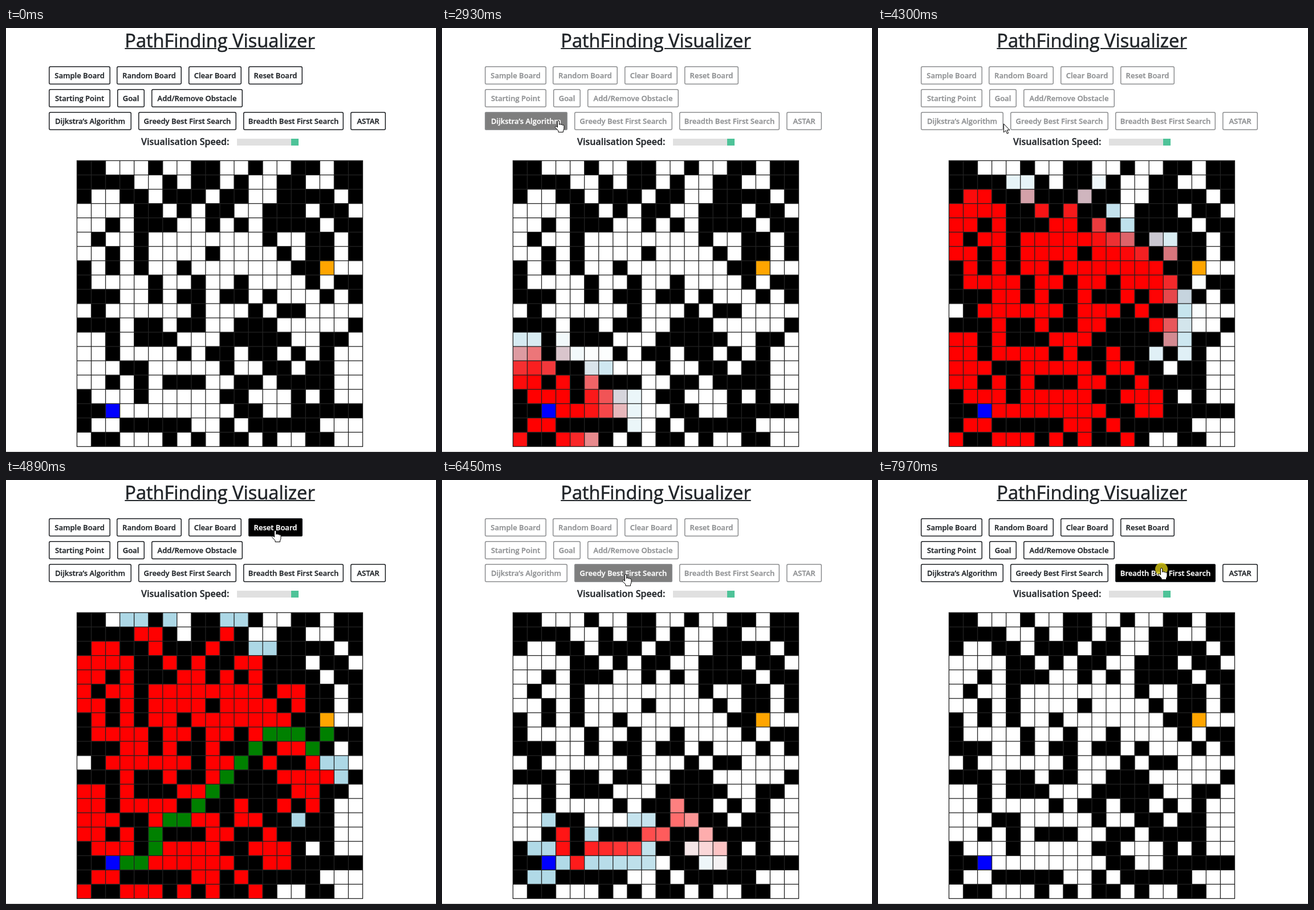
These frames come from a looping animation (754x743 px, 8 s). An HTML page with a canvas:

```html
<!DOCTYPE html>
<html lang="en">
<head>
<meta charset="utf-8">
<title>PathFinding Visualizer</title>
<style>
html, body { margin: 0; width: 100%; height: 100%; overflow: hidden; background: #fff; }
body { position: relative; font-family: "Open Sans", "Noto Sans", sans-serif; color: #212529; }
body > * { position: absolute; white-space: nowrap; }
h1 { left: 0; top: 0; width: 750px; margin: 0; text-align: center;
  font-size: 32.6px; font-weight: 400; line-height: 44px; text-decoration: underline 2px;
  -webkit-text-stroke: .6px; }
.btn { height: 32px; line-height: 32px; text-align: center; font-size: 13.05px; font-weight: 600;
  -webkit-text-stroke: .3px; border-radius: 3px; box-shadow: inset 0 0 0 1.5px #1c1f23; }
.btn.hover { background: #000; color: #fff; }
#label { left: 237px; top: 187px; line-height: 24px; font-size: 16.05px; font-weight: 600;
  -webkit-text-stroke: .3px; }
#slider { left: 405px; top: 194px; width: 108px; height: 12px; background: #d3d3d3; }
#slider i { position: absolute; right: 0; width: 13px; height: 12px; background: #04aa6d; }
#rule { left: 0; top: 742px; width: 754px; height: 1px; background: #c8c8c8; }
canvas, svg { left: 0; top: 0; }
</style>
</head>
<body>
<canvas id="board" width="754" height="743"></canvas>
<h1>PathFinding Visualizer</h1>
<div id="label">Visualisation Speed:</div>
<div id="slider"><i></i></div>
<div id="rule"></div>
<svg id="overlay" width="754" height="743" style="z-index:1">
  <circle id="click" r="11" fill="#d7c814" fill-opacity=".8"/>
  <g id="cursor" fill="#fff" stroke="#000" stroke-linejoin="round">
    <path id="arrow" d="M0 0V15L3.5 11.8L6 17.3L8.2 16.3L5.8 11H10.5Z"/>
    <path id="hand" transform="translate(-6.5 0)" d="M5 12V2a1.6 1.6 0 0 1 3.2 0v5.5a1.5 1.5 0 0 1 3 .3a1.5 1.5 0 0 1 2.8 .7a1.4 1.4 0 0 1 2.5 .8V14q0 2-1.5 4v2.5H6.5V18L1.2 12.5a1.5 1.5 0 0 1 2-2L5 12z"/>
  </g>
</svg>
<script>
const $ = id => document.getElementById(id);
const LOOP = 8000, TICK = 11, FADE = 275, SIZE = 20;
const WHITE = [255, 255, 255], OPEN = [173, 216, 230], VISITED = [255, 0, 0], PATH = [0, 128, 0];

const walls = `
##...#..##..#..##.##
####..#.##.#..##..##
#..##.###.##..####.#
....##.#.##..###.##.
..#.###..#.#.####.##
.#..#........#..##.#
..#.#....#....#.##.#
#.#.#..#.......##...
#....#..#..#....#.##
###..#.##.##.#...#.#
.#......#...#.##....
###.##.##..###.....#
..#.###...#####..##.
..#....#.##.##.#.#..
...##.....#..##.##..
..#.#.###..##.####..
#...#.....##...#.#..
##.........##..#####
#..#####..#.#####...
.##...#.#.##.#..##..`.replace(/\n/g, '');

const START = 17 * SIZE + 2, GOAL = 7 * SIZE + 17;
const row = i => Math.floor(i / SIZE), col = i => i % SIZE;
// Row and column steps: straight ones first, then diagonals
const STEPS = [[-1, 0], [0, 1], [1, 0], [0, -1], [-1, -1], [-1, 1], [1, 1], [1, -1]];

// Colour changes of each cell, in order of time
const changes = Array.from(walls, () => []);
const paint = (cell, at, to) => {
  if (cell !== START && cell !== GOAL) changes[cell].push({ at, to });
};

const nearness = i => (row(i) - row(GOAL)) ** 2 + 1.1 * (col(i) - col(GOAL)) ** 2;

// Schedules a whole search and its path; returns the end time
function search(at, greedy) {
  const cost = { [START]: 0 }, parent = {}, done = new Set(), open = [START];
  const rank = i => greedy ? nearness(i) : cost[i];
  while (open.length) {
    let best = 0;
    open.forEach((cell, k) => { if (rank(cell) < rank(open[best])) best = k; });
    const [cur] = open.splice(best, 1);
    done.add(cur);
    paint(cur, at, VISITED);
    for (const [dr, dc] of STEPS) {
      const r = row(cur) + dr, c = col(cur) + dc, next = r * SIZE + c;
      if (r < 0 || c < 0 || r >= SIZE || c >= SIZE || walls[next] === '#' || done.has(next)) continue;
      const total = cost[cur] + (dr && dc ? 1414 : 1000);
      const known = next in cost;
      if (known && total >= cost[next]) continue;
      cost[next] = total;
      parent[next] = cur;
      if (next === GOAL) {
        for (let cell = cur; cell !== START; cell = parent[cell]) paint(cell, at += TICK, PATH);
        return at;
      }
      if (!known) {
        paint(next, at, OPEN);
        open.push(next);
      }
    }
    at += TICK;
  }
  return at;
}

const reset = at => changes.forEach((list, cell) => { if (list.length) paint(cell, at, WHITE); });

const busy = [];
busy.push([2530, search(2608, false)]);
reset(5380);
busy.push([6110, search(6250, true)]);
reset(7450);

const clamp = x => Math.min(1, Math.max(0, x));

// The CSS "ease" curve, solved by bisection
function ease(x) {
  if (x <= 0 || x >= 1) return clamp(x);
  const bez = (a, b, u) => 3 * a * u * (1 - u) ** 2 + 3 * b * u * u * (1 - u) + u ** 3;
  let lo = 0, hi = 1;
  for (let k = 0; k < 14; k++) {
    const mid = (lo + hi) / 2;
    if (bez(.25, .25, mid) < x) lo = mid; else hi = mid;
  }
  return bez(.1, 1, lo);
}

// Each fade starts from whatever colour the previous one had reached
function shade(list, t, n = list.length - 1) {
  while (n >= 0 && list[n].at > t) n--;
  if (n < 0) return WHITE;
  const { at, to } = list[n], p = ease((t - at) / FADE);
  if (p === 1) return to;
  return shade(list, at, n - 1).map((v, k) => v + (to[k] - v) * p);
}

const ctx = $('board').getContext('2d');
const LEFT = 124.45, TOP = 232.45, PITCH = 25.05, LINE = 1.3;

function drawBoard(t) {
  ctx.clearRect(0, 0, 754, 743);
  ctx.fillStyle = '#222';
  ctx.fillRect(LEFT - LINE / 2, TOP - LINE / 2, SIZE * PITCH + LINE, SIZE * PITCH + LINE);
  for (let i = 0; i < walls.length; i++) {
    ctx.fillStyle = i === START ? '#00f' : i === GOAL ? '#ffa500' : walls[i] === '#' ? '#000'
      : `rgb(${shade(changes[i], t).map(Math.round)})`;
    ctx.fillRect(LEFT + LINE / 2 + PITCH * col(i), TOP + LINE / 2 + PITCH * row(i), PITCH - LINE, PITCH - LINE);
  }
}

const buttons = [
  ['Sample Board', 75, 67, 108], ['Random Board', 194, 67, 114],
  ['Clear Board', 320, 67, 93], ['Reset Board', 425, 67, 95],
  ['Starting Point', 75, 107, 108], ['Goal', 195, 107, 48], ['Add/Remove Obstacle', 255, 107, 160],
  ['Dijkstra’s Algorithm', 75, 147, 145], ['Greedy Best First Search', 232, 147, 172],
  ['Breadth Best First Search', 416, 147, 176], ['ASTAR', 604, 147, 62]
].map(([text, x, y, w]) => {
  const el = document.createElement('div');
  el.className = 'btn';
  el.textContent = text;
  el.style.cssText = `left:${x}px;top:${y}px;width:${w}px`;
  document.body.append(el);
  return { el, x, y, w };
});

// Pointer route: time, x, y
const route = [
  [450, 735, 745], [1190, 253, 216], [1400, 250, 198], [1850, 204, 162], [4160, 204, 162],
  [4300, 220, 168], [4890, 472, 88], [5370, 472, 88], [5650, 357, 132], [5970, 322, 165],
  [6500, 322, 165], [6840, 489, 98], [6920, 489, 98], [7180, 486, 86], [7440, 486, 86], [7970, 497, 154]
];
const clicks = [2530, 5370, 6110, 7440, 7940];

function pointer(t) {
  const k = route.findIndex(p => p[0] > t);
  if (k <= 0) return route[k ? route.length - 1 : 0].slice(1);
  const [t0, x0, y0] = route[k - 1], [t1, x1, y1] = route[k], p = (t - t0) / (t1 - t0);
  return [x0 + (x1 - x0) * p, y0 + (y1 - y0) * p];
}

const inside = (x, y, left, top, w, h) => x >= left && x <= left + w && y >= top && y <= top + h;

function draw(t) {
  drawBoard(t);
  const [x, y] = pointer(t);
  const dim = Math.max(...busy.map(([a, b]) => clamp((t - a) / 100) - clamp((t - b) / 100)));
  let over = false;
  for (const b of buttons) {
    const hit = inside(x, y, b.x, b.y, b.w, 30);
    over = over || hit;
    b.el.classList.toggle('hover', hit);
    b.el.style.opacity = 1 - dim / 2;
  }
  $('slider').style.opacity = inside(x, y, 237, 188, 156, 24) ? 1 : .7;
  $('cursor').setAttribute('transform', `translate(${x} ${y})`);
  $('arrow').style.display = over ? 'none' : '';
  $('hand').style.display = over ? '' : 'none';
  $('click').setAttribute('cx', x);
  $('click').setAttribute('cy', y + 2);
  $('click').style.display = clicks.some(c => t >= c && t < c + 150) ? '' : 'none';
}

const begin = performance.now();
function frame() {
  draw((performance.now() - begin) % LOOP);
  requestAnimationFrame(frame);
}
frame();
</script>
</body>
</html>
```
